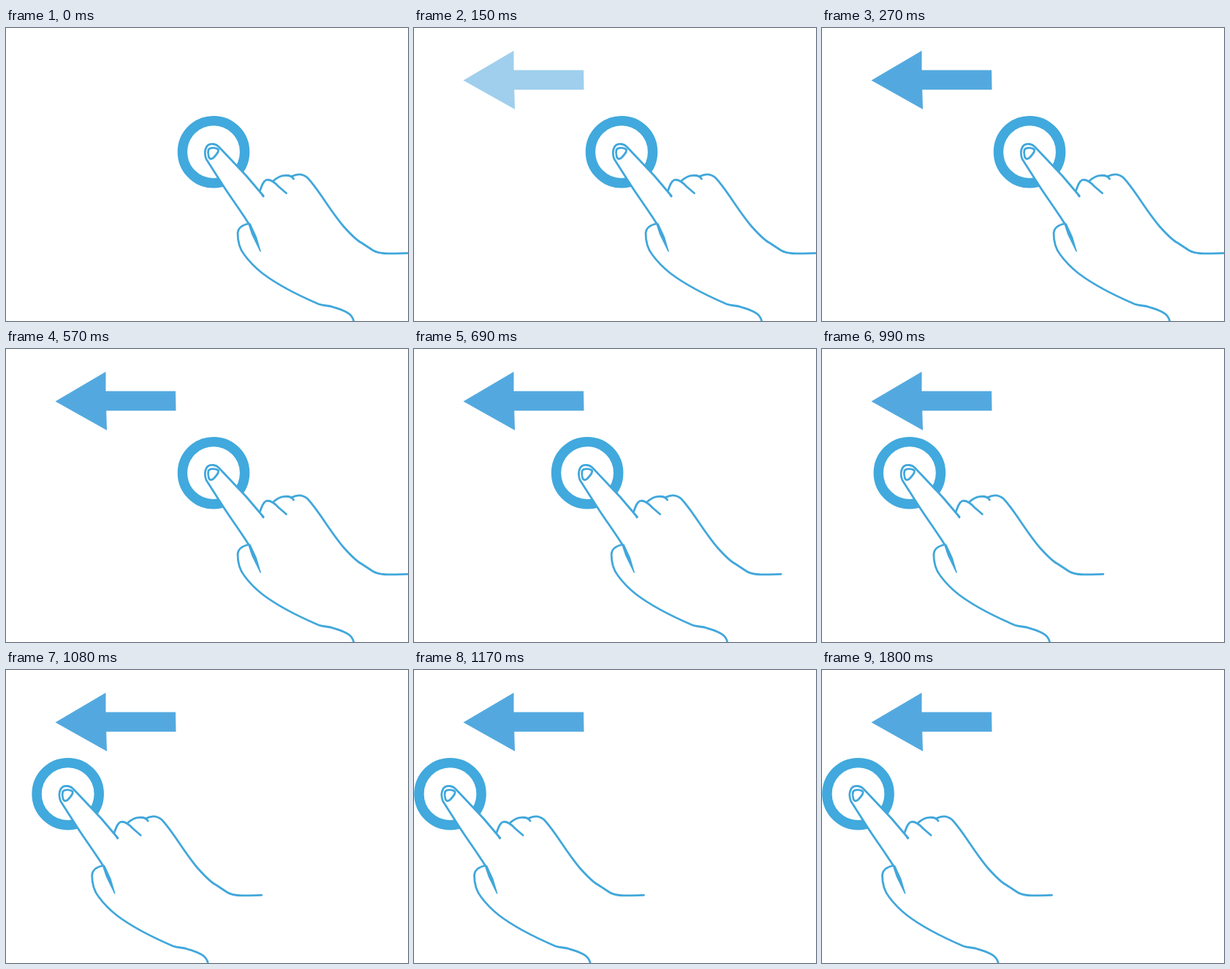
Animation of 550 by 400 pixels, one loop 2.1 s. Source, as an HTML page:

```html
<!DOCTYPE html>
<html lang="en">
<head>
<meta charset="utf-8">
<title>Swipe left</title>
<style>
  html, body { margin: 0; width: 100%; height: 100%; overflow: hidden; background: #fff; }
  svg { display: block; width: 100%; height: 100%; }
  .line { fill: none; stroke: #41a7db; stroke-width: 2.8; stroke-linecap: round; stroke-linejoin: round; }
  .solid { fill: #41a7db; }
</style>
</head>
<body>
<svg viewBox="0 0 550 400">
  <path id="arrow" fill="#53a9df" d="M67.5 71.5 136.5 31V57.5H232L232.5 84.3H137.2L138 111Z"/>
  <g id="hand">
    <circle cx="284" cy="169.2" r="42.6" fill="none" stroke="#41a9dd" stroke-width="13.4"/>
    <!-- finger, filled to hide the ring behind it -->
    <path class="line" style="fill:#fff" d="M332 267C322 251 308 232 297 215L274 179C271 172 272 163 277 159.5C281 157.5 287 158 291 162L329 202L352 229"/>
    <path class="line" d="M277 166C279 163 287 162.500 290.500 166C291.500 170 287 173 285 176C282 179.500 278.500 180 277.300 175.500C276.300 172 276.300 168.500 277 166Z"/>
    <path class="solid" d="M346 222L353.500 229Q353.500 232 351 231Z"/>
    <!-- folded fingers and wrist -->
    <path class="line" d="M347.500 222C350 215 352 209 356 207.500C362 206 368 211 373 216.500L383.500 225.500"/>
    <path class="line" d="M365.500 209C371 204 376 201 382 201.300C387 201 391 202 393.500 206"/>
    <path class="line" d="M391 202.500C398 199 406 199 412 204C427 219 443 249 462 271C471 281 480 290 486 293L502 303.500C512 309.500 528 308 549 307.300"/>
    <!-- thumb and lower arm -->
    <path class="line" d="M332 267C323 269 317.500 273 317 280C317 291 320 302 326 309.500C333 319 342 328 351 335C372 351 400 365 428 377C435 379.500 441 378.500 447 380.800C455 383 460 384.500 466 388C472 391 475 395 476 402"/>
    <path class="solid" d="M331 267L334.500 266.500L343 285L349 305.500L347.500 305.500L336 282Z"/>
  </g>
</svg>
<script>
  const LOOP = 2100, STEP = 30;
  const arrow = document.getElementById("arrow");
  const hand = document.getElementById("hand");
  const start = performance.now();

  const progress = (time, from, length) => Math.min(1, Math.max(0, (time - from) / length));

  function draw() {
    const elapsed = Math.max(0, performance.now() - start) % LOOP;
    const time = Math.floor(elapsed / STEP) * STEP;
    arrow.setAttribute("opacity", progress(time, 0, 270));
    hand.setAttribute("transform", `translate(${-234.5 * progress(time, 570, 600)} 0)`);
    requestAnimationFrame(draw);
  }
  draw();
</script>
</body>
</html>
```
